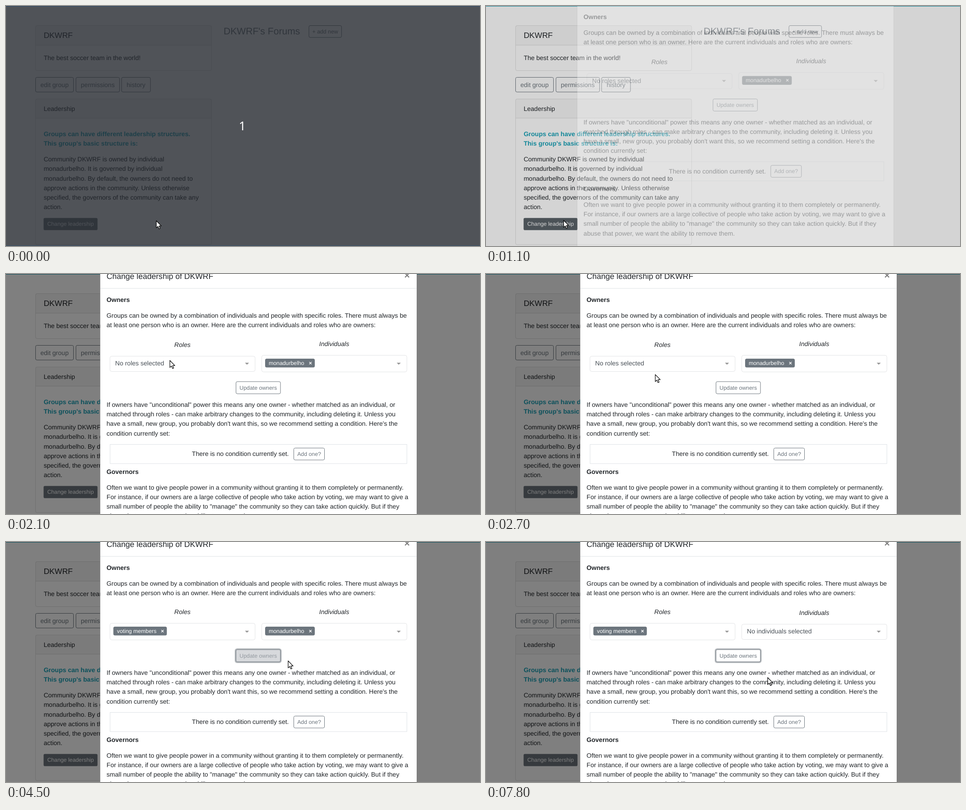
Write an HTML page that moves like this. It is 1050x533 px and loops after 8 s.

```html
<!DOCTYPE html>
<html lang="en">
<head>
<meta charset="utf-8">
<title>Change leadership</title>
<style>
html, body { margin: 0; width: 100%; height: 100%; overflow: hidden; background: #fff; }
svg { display: block; width: 100%; height: 100%; }
text { font-family: "Liberation Sans", Arial, sans-serif; text-rendering: geometricPrecision; white-space: pre; }
</style>
</head>
<body>
<svg id="stage" viewBox="0 0 1050 533"></svg>
<script>
const LOOP = 8000, STEP = 100;
const GROUP = 'DKWRF', USER = 'monadurbelho';
const BODY = 14.06, SMALL = 12.3, TITLE = 17.58;
const INK = '#212529', GREY = '#6c757d';

// Text is placed by the middle of its line.
const text = (x, mid, str, { size = BODY, fill = INK, extra = '' } = {}) =>
  `<text x="${x}" y="${(mid + size * 0.3465).toFixed(2)}" font-size="${size}" fill="${fill}" ${extra}>${str}</text>`;

const lines = (x, mid, rows, opts) =>
  rows.map((row, i) => text(x, mid + i * 21.09, row, opts)).join('');

const rect = (x, y, w, h, extra) => `<rect x="${x}" y="${y}" width="${w}" height="${h}" ${extra}/>`;

const group = (id, content, extra = '') => `<g id="${id}" ${extra}>${content}</g>`;

const centered = 'text-anchor="middle"';
const bold = 'font-weight="700"';

const button = (x, y, w, h, label, size = BODY) =>
  rect(x, y, w, h, `rx="3" fill="none" stroke="${GREY}"`) +
  text(x + w / 2, y + h / 2, label, { size, fill: GREY, extra: centered });

const card = (y, h, headH, title, size) =>
  rect(65.5, y, 390, h, 'rx="3.5" fill="#fff" stroke="#000" stroke-opacity=".125"') +
  rect(66, y + 0.5, 389, headH, 'fill="#000" fill-opacity=".03"') +
  rect(66, y + headH, 389, 1, 'fill="#000" fill-opacity=".125"') +
  text(83.4, y + headH / 2 + 0.3, title, { size });

const tag = (x, w, label) =>
  rect(x, 188, w, 19.5, `rx="3.5" fill="${GREY}"`) +
  text(x + 8, 197.8, label, { size: SMALL, fill: '#fff' }) +
  text(x + w - 9.7, 197.8, '×', { size: SMALL, fill: '#fff', extra: `${centered} ${bold}` });

// One dropdown in its empty and its filled state.
function select(id, x, heading, hint, tagWidth, label) {
  const box = (y, h) => rect(x + 0.5, y, 321.5, h, 'rx="4" fill="#fff" stroke="#e3e4e6"');
  const head = mid => text(x + 161, mid, heading, { extra: `${centered} font-style="italic"` });
  return group(id + 'Empty', head(156.7) + box(182.5, 34) + text(x + 12, 198.3, hint, { fill: '#495057' })) +
    group(id + 'Full', head(155) + box(180.5, 37) + tag(x + 8, tagWidth, label)) +
    `<path d="M${x + 299.5} 197h9l-4.5 4.6z" fill="#999"/>`;
}

const page =
  rect(0, 0, 1050, 533, 'fill="#fff"') +
  rect(0, 0, 1050, 1, 'fill="#17a2b8"') +
  card(43.5, 100, 43, GROUP, TITLE) +
  text(83.4, 115, 'The best soccer team in the world!') +
  button(65.5, 158.5, 84, 32.5, 'edit group') +
  button(155, 158.5, 96.5, 32.5, 'permissions') +
  button(256, 158.5, 64, 32.5, 'history') +
  card(206.5, 323.5, 42, 'Leadership', BODY) +
  lines(83.4, 284.3, ['Groups can have different leadership structures.', "This group's basic structure is:"],
    { fill: '#17a2b8', extra: bold }) +
  lines(83.4, 340.5, [
    `Community ${GROUP} is owned by individual`,
    `${USER}. It is governed by individual`,
    `${USER}. By default, the owners do not need to`,
    'approve actions in the community. Unless otherwise',
    'specified, the governors of the community can take any',
    'action.']) +
  rect(83.3, 470.7, 119.4, 27, `id="change" rx="2.8" fill="${GREY}"`) +
  text(143, 484.2, 'Change leadership', { size: SMALL, fill: '#fff', extra: centered }) +
  text(482, 55.3, `${GROUP}'s Forums`, { size: 21.1, fill: GREY }) +
  button(671, 43.5, 72.3, 26.3, '+ add new', SMALL);

const update =
  rect(508.1, 237.6, 101, 29.8, `id="ring" rx="4" fill="none" stroke="${GREY}" stroke-opacity=".5" stroke-width="2.8"`) +
  rect(509.5, 239, 98.5, 27, `id="fill" rx="3" stroke="${GREY}"`) +
  text(558.7, 252.5, 'Update owners', { size: SMALL, extra: `id="label" ${centered}` });

const modal =
  rect(208.5, -40, 701.5, 700, 'fill="#fff" stroke="#000" stroke-opacity=".2"') +
  text(222.8, 4.7, `Change leadership of ${GROUP}`, { size: TITLE }) +
  text(888.5, 3, '×', { size: 21.1, fill: '#7f7f7f', extra: `${centered} ${bold}` }) +
  rect(209, 31.5, 701, 1, 'fill="#dee2e6"') +
  text(222.8, 56.9, 'Owners', { extra: bold }) +
  lines(222.8, 92, [
    'Groups can be owned by a combination of individuals and people with specific roles. There must always be',
    'at least one person who is an owner. Here are the current individuals and roles who are owners:']) +
  select('roles', 229.8, 'Roles', 'No roles selected', 118.5, 'voting members') +
  select('people', 566, 'Individuals', 'No individuals selected', 110, USER) +
  update +
  lines(222.8, 290.4, [
    'If owners have "unconditional" power this means any one owner - whether matched as an individual, or',
    'matched through roles - can make arbitrary changes to the community, including deleting it. Unless you',
    "have a small, new group, you probably don't want this, so we recommend setting a condition. Here's the",
    'condition currently set:']) +
  rect(230.5, 378.5, 657.5, 42.5, 'fill="none" stroke="#dee2e6"') +
  text(411.8, 399.5, 'There is no condition currently set.') +
  button(637.5, 386.5, 68, 26.5, 'Add one?', SMALL) +
  text(222.8, 438.7, 'Governors', { extra: bold }) +
  lines(222.8, 474, [
    'Often we want to give people power in a community without granting it to them completely or permanently.',
    'For instance, if our owners are a large collective of people who take action by voting, we may want to give a',
    'small number of people the ability to "manage" the community so they can take action quickly. But if they',
    'abuse that power, we want the ability to remove them.']);

const countdown =
  rect(0, 0, 1050, 533, 'fill="#1f232a" fill-opacity=".78"') +
  rect(0, 0, 1050, 1, 'fill="#2a4a6c"') + rect(0, 532, 1050, 1, 'fill="#34506c"') +
  `<text x="523.5" y="276" font-size="27" fill="#fff" ${centered} style="font-family:'Noto Sans','Open Sans',sans-serif">1</text>`;

const stage = document.getElementById('stage');
stage.innerHTML = page +
  rect(0, 0, 1050, 533, 'id="backdrop" fill="#000"') +
  group('modal', modal) +
  group('countdown', countdown) +
  '<path id="cursor" d="M0 0V15.6L3.6 12.4 6 18 8.5 17 6.2 11.4H11Z" fill="#fff" stroke="#000" stroke-width="1.2" stroke-linejoin="round"/>';

const el = {};
stage.querySelectorAll('[id]').forEach(node => el[node.id] = node);

// Pointer stops: time, x, y
const pointer = [
  [400, 333, 477], [800, 172, 476], [1400, 172, 476], [1800, 358, 206], [2000, 358, 206],
  [2100, 363, 192], [2300, 363, 192], [2900, 381, 239], [3300, 381, 239], [3500, 530, 248],
  [3600, 530, 248], [3900, 566, 252], [4200, 566, 252], [4500, 625, 264], [4700, 625, 264],
  [5100, 700, 215], [5500, 680, 193], [5800, 680, 193], [6400, 614, 243], [6600, 588, 250],
  [6900, 588, 250], [7100, 690, 258], [7600, 690, 258], [7800, 624, 301]];

// Hover strength of the update button: time, amount
const hover = [
  [3400, 0], [3500, 0.6], [3700, 1], [4300, 1], [4500, 0.27], [4700, 0.27], [4800, 0],
  [6400, 0], [6600, 1], [6900, 1], [7100, 0]];

const clamp = v => Math.min(1, Math.max(0, v));

function sample(keys, t) {
  const i = keys.findIndex(k => k[0] > t);
  if (i === 0) return keys[0].slice(1);
  if (i < 0) return keys[keys.length - 1].slice(1);
  const a = keys[i - 1], b = keys[i], p = (t - a[0]) / (b[0] - a[0]);
  return a.slice(1).map((v, n) => v + (b[n + 1] - v) * p);
}

const show = (node, on) => node.setAttribute('display', on ? 'inline' : 'none');

function draw(ms) {
  const t = Math.floor(ms / STEP) * STEP;
  show(el.countdown, t < 400);
  el.change.setAttribute('fill', t >= 700 && t < 1200 ? '#5a6268' : GREY);

  const fade = clamp((t - 1050) / 150);
  const lift = -50 * (1 - clamp((t - 1050) / 260)) ** 2;
  el.backdrop.setAttribute('opacity', fade / 2);
  el.modal.setAttribute('opacity', fade);
  el.modal.setAttribute('transform', `translate(${t < 1200 ? -6.7 : 0} ${lift.toFixed(2)})`);

  const voting = t >= 3100, cleared = t >= 5700;
  show(el.rolesEmpty, !voting);
  show(el.rolesFull, voting);
  show(el.peopleEmpty, cleared);
  show(el.peopleFull, !cleared);

  const [heat] = sample(hover, t);
  const pressed = t === 4200 || t === 6800;
  const mix = c => Math.round(c + (255 - c) * heat);
  show(el.ring, t >= 4200);
  el.fill.setAttribute('fill', pressed ? '#545b62' : GREY);
  el.fill.setAttribute('fill-opacity', heat);
  el.label.setAttribute('fill', `rgb(${mix(108)},${mix(117)},${mix(125)})`);

  const [x, y] = sample(pointer, t);
  el.cursor.setAttribute('transform', `translate(${x.toFixed(1)} ${y.toFixed(1)})`);
}

let start;
function tick(now) {
  start ??= now;
  draw((now - start) % LOOP);
  requestAnimationFrame(tick);
}
draw(0);
requestAnimationFrame(tick);
</script>
</body>
</html>
```
